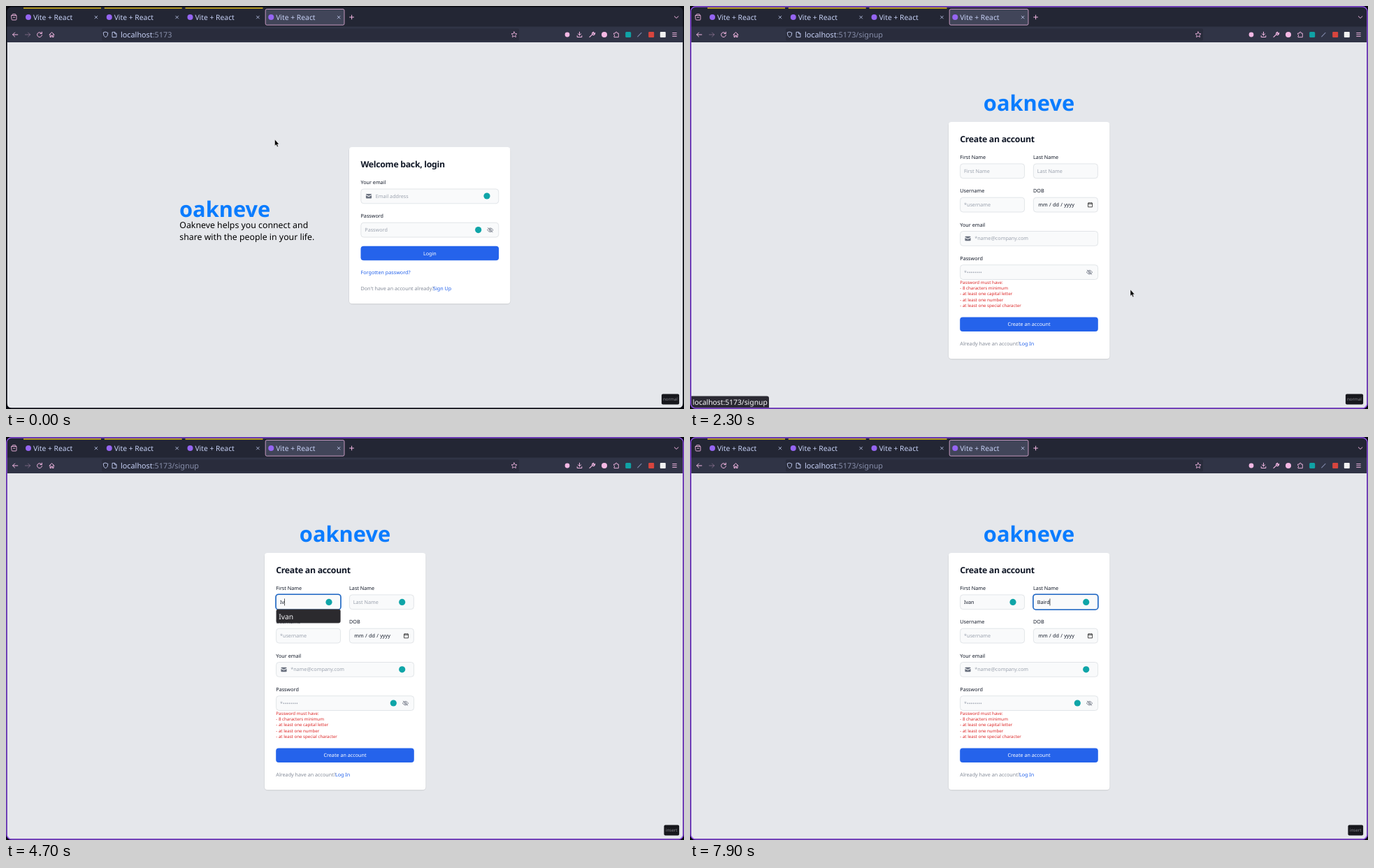
Write an HTML page that moves like this. It is 970 px wide and 577 px high and loops after 8000 ms.

```html
<!DOCTYPE html>
<html lang="en">
<head>
<meta charset="utf-8">
<title>Sign up demo</title>
<style>
  html, body { margin: 0; width: 100%; height: 100%; overflow: hidden; background: #08090f; }
  svg { display: block; width: 970px; height: 577px; font: 7.19px "Noto Sans", sans-serif; text-rendering: geometricPrecision; }
  text { white-space: pre; }
  .m { font-weight: 500; }
  .logo { font-size: 30.8px; font-weight: 700; fill: #0a7cff; }
  .head { font-size: 12.32px; font-weight: 700; letter-spacing: -.025em; fill: #111827; }
  .lead { font-size: 12.32px; }
  .ui { font-size: 10.33px; fill: #c6d0f5; }
  .url { font-size: 10.82px; fill: #c6d0f5; }
  .rule { font-size: 6.16px; font-weight: 500; fill: #dc2626; }
  .mode { font-size: 6.2px; fill: #85858c; text-anchor: middle; }
  .dark { fill: #111827; }
  .date { fill: #111827; word-spacing: .45px; }
  .hint { fill: #9ca3af; }
  .light { font-weight: 300; fill: #858c99; }
  .blue { fill: #2563eb; }
  .mid { text-anchor: middle; }
  .line { fill: none; stroke: #f4b8e4; stroke-linecap: round; stroke-linejoin: round; }
</style>
</head>
<body>
<svg id="stage" viewBox="0 0 970 577"></svg>
<script>
const stage = document.getElementById('stage');
const el = id => document.getElementById(id);

// Markup helpers
const text = (x, y, s, cls = '', extra = '') => `<text x="${x}" y="${y}" class="${cls}" ${extra}>${s}</text>`;
const rect = (x, y, w, h, fill, r = 0, extra = '') =>
  `<rect x="${x}" y="${y}" width="${w}" height="${h}" rx="${r}" fill="${fill}" ${extra}/>`;
const dot = (x, y, r, fill) => `<circle cx="${x}" cy="${y}" r="${r}" fill="${fill}"/>`;
const line = (d, w = 1, extra = '') => `<path class="line" d="${d}" stroke-width="${w}" ${extra}/>`;
const group = (id, body) => `<g id="${id}">${body}</g>`;
const card = (x, y, w, h) =>
  rect(x, y + .8, w, h, '#0000', 4.5, 'stroke="#000" stroke-opacity=".07" stroke-width="1.6"') + rect(x, y, w, h, '#fff', 4);
const field = (x, y, w) => rect(x, y, w, 20.8, '#f9fafb', 4, 'stroke="#d1d5db" stroke-width=".6"');
const button = (x, y, label, id) =>
  rect(x, y, 197.6, 20.5, '#2563eb', 4, `id="${id}"`) + text(x + 98.8, y + 12.8, label, 'm mid', 'fill="#fff"');
const badge = (x, y) => dot(x, y, 4.6, '#0fa5a8');
const mail = (x, y) => `<g transform="translate(${x} ${y})" fill="#6b7280">
  <path d="M-4.1-2.2Q-4.1-3.2-3.1-3.2H3.1Q4.1-3.2 4.1-2.2L0-.1ZM-4.1-1.1L0 1L4.1-1.1V2.3Q4.1 3.3 3.1 3.3H-3.1Q-4.1 3.3-4.1 2.3Z"/></g>`;
const eye = (x, y) => `<g transform="translate(${x} ${y})" fill="none" stroke="#6b7280" stroke-width=".8">
  <path d="M-4.3 0Q0-5.6 4.3 0Q0 5.6-4.3 0ZM-3.6-3.4L3.6 3.4"/><circle r="1.5"/></g>`;
const popup = (id, x, w, h, names) => group(id, rect(x, 246.8, w, h, '#2b2a2e', 2.5, 'stroke="#48474d" stroke-width=".5"') +
  names.map((n, i) => text(x + 3.4, 260.8 + i * 22, n, 'ui', 'style="fill:#f4f4f8"')).join(''));

function chrome() {
  const tabs = [0, 1, 2, 3].map(i => {
    const x = 25 + i * 115.75;
    const frame = i < 3 ? rect(x, 2.2, 111, 1.6, '#d3b51f')
      : rect(371.2, 4.5, 112.8, 22.7, '#414559', 2, 'stroke="#f4b8e4" stroke-width=".75"');
    return frame + dot(x + 7, 16, 4, '#9565f2') + text(x + 13.9, 20, 'Vite + React', 'ui') +
      line(`M${x + 102} 14.2l3.8 3.8m0-3.8l-3.8 3.8`, .8, 'style="stroke:#c6d0f5"');
  }).join('');
  return rect(1.5, 1.5, 967, 574, '#232634', 6) + rect(1.5, 29.5, 967, 23, '#303446') +
    rect(137, 32.3, 597, 17.4, '#292c3c', 2) + tabs +
    line('M8 13.5h7v5.5q0 1-1 1h-5q-1 0-1-1zM8.5 13.5l1-1.8h4l1 1.8M10.4 16.2h2.3', .9) +
    line('M491.7 16h5.8m-2.9-2.9v5.8') + line('M956.3 14.8l2.8 2.6l2.8-2.6') +
    line('M16.8 41H9.6m3-3l-3 3l3 3') + line('M27.4 41h7.2m-3-3l3 3l-3 3', 1, 'opacity=".35"') +
    line('M51 39.4a3.4 3.4 0 1 0 .4 2.3M51.3 37.2v2.4h-2.4') +
    line('M62 41l3.5-3.3l3.5 3.3M63 40.5v4h1.6v-2.4h1.8v2.4h1.6v-4') +
    line('M142.5 37.2l3.3 1.2q.2 4.6-3.3 6.6q-3.5-2-3.3-6.6z', .9, 'style="stroke:#c6d0f5"') +
    line('M152.4 37.4h3.4l2.2 2.2v5h-5.6zM155.6 37.6v2.2h2.2', .9, 'style="stroke:#c6d0f5"') +
    line('M727 36.9l1.2 2.6 2.8.3-2.1 1.9.6 2.8-2.5-1.4-2.5 1.4.6-2.8-2.1-1.9 2.8-.3z', .8) +
    dot(803, 41, 3.4, '#f4b8e4') +
    line('M820.5 37.2v4.6m-2.2-2l2.2 2.1l2.2-2.1M817.2 42.6v1.9h6.6v-1.9') +
    line('M835 44.4l3.6-3.6M838.8 40.8q-1-2.4 1.8-3.5l-.4 1.8 1.3.7 1-1.4q.4 3-2.4 3.2z', 1.2) +
    dot(856, 41, 4, '#f4b8e4') +
    line('M870 39h2v-1.2q1.3-1.4 2.3 0V39h2v5.6h-6.3v-1.6q2-1 0-2.1z', .9) +
    rect(886.2, 37, 8, 8, '#10a3a6', 1.5) + line('M903.7 43.8l5.3-5.5', 1.1, 'style="stroke:#7f86a8"') +
    rect(919.2, 37, 8, 8, '#d8453e', 1) + rect(935.8, 37, 8, 8, '#f2f2f2', 1) +
    line('M953.7 38.5h5.6m-5.6 2.5h5.6m-5.6 2.5h5.6', .9) +
    `<text x="164" y="45" class="url">localhost<tspan fill="#888fab">:5173<tspan id="path">/signup</tspan></tspan></text>` +
    '<path d="M1.8 52H968.2V569Q968.2 575.3 962 575.3H8Q1.8 575.3 1.8 569Z" fill="#e5e7eb"/>';
}

function loginPage() {
  return text(248, 302, 'oakneve', 'logo') +
    text(248.3, 318.3, 'Oakneve helps you connect and', 'lead') +
    text(248.3, 334.6, 'share with the people in your life.', 'lead') +
    card(491, 202, 230.4, 224) + text(507.5, 231.2, 'Welcome back, login', 'head') +
    text(507.5, 254.6, 'Your email', 'm dark') + field(507.8, 262, 197) + mail(519, 272.2) +
    text(528.8, 274.7, 'Email address', 'hint') + badge(688, 272) +
    text(507.5, 302.9, 'Password', 'm dark') + field(507.8, 310.2, 197) +
    text(513.3, 323, 'Password', 'hint') + badge(675.7, 320.6) + eye(692.8, 320.7) +
    button(507.5, 343.7, 'Login', 'loginButton') +
    text(507.5, 384.2, 'Forgotten password?', 'm blue') +
    text(507.5, 406.8, "Don't have an account already?", 'light') +
    text(611, 406.8, 'Sign Up', 'm blue', 'id="signUp"');
}

function signupPage() {
  const rules = ['Password must have:', '- 8 characters minimum', '- at least one capital letter',
    '- at least one number', '- at least one special character'];
  return text(485, 150.2, 'oakneve', 'logo mid') + card(370, 166, 230.4, 339) +
    text(386.3, 194.8, 'Create an account', 'head') +
    text(386.3, 218.7, 'First Name', 'm dark') + field(386.6, 225.9, 92) +
    text(491.1, 218.7, 'Last Name', 'm dark') + field(491.4, 225.9, 92) +
    text(386.3, 267.2, 'Username', 'm dark') + field(386.6, 274.2, 92) + text(392, 287.1, '*username', 'hint') +
    text(491.1, 267.2, 'DOB', 'm dark') + field(491.4, 274.2, 92) + text(498.3, 287.1, 'mm / dd / yyyy', 'date') +
    '<path d="M569.5 282h6v5.8h-6zM569.5 283.3h6M571 281v1M574 281v1" fill="none" stroke="#222" stroke-width=".8"/>' +
    text(386.3, 315.5, 'Your email', 'm dark') + field(386.6, 322.5, 197) + mail(397.5, 333) +
    text(407.2, 335.3, '*name@company.com', 'hint') +
    text(386.3, 363.7, 'Password', 'm dark') + field(386.6, 370.7, 197) +
    text(392, 383.6, '*••••••••', 'hint') + eye(571.5, 381.2) +
    rules.map((r, i) => text(386.3, 398 + i * 8.22, r, 'rule')).join('') +
    button(386.2, 445.4, 'Create an account', 'createButton') +
    text(386.3, 485.8, 'Already have an account?', 'light') + text(470.9, 485.8, 'Log In', 'm blue') +
    rect(386, 225.2, 93, 22, 'none', 4, 'id="ring" stroke="#1a64c4" stroke-width="1.6"') +
    text(392, 239, '', '', 'id="first"') + text(496.8, 239, '', '', 'id="last"') +
    rect(0, 231.4, .7, 10, '#111', 0, 'id="caret"') +
    group('badges', badge(462, 236.4) + badge(566.7, 236.4) + badge(566.7, 332.8) + badge(554.3, 381)) +
    group('panel', rect(386, 249, 179, 99, '#fff', 3, 'stroke="#d1d5db" stroke-width=".7"')) +
    popup('firstMenu', 386.8, 91.6, 19.4, ['Ivan']) + popup('lastMenu', 491.6, 91.6, 46, ['Baird', 'Bailey']);
}

const cursors =
  '<path id="arrow" d="M0 0V9.2L2 7.4L3.5 10.7L5 10L3.6 6.9H6.2Z" fill="#000" stroke="#fff" stroke-width=".5"/>' +
  '<path id="hand" d="M-.8.4Q0-.5.8.4V3.6L4.2 4.4Q5.2 4.8 5 6L4.2 8.4V10H-.2V8.6L-2.5 6.2Q-2.6 4.9-.8 6Z" fill="#000" stroke="#fff" stroke-width=".5"/>' +
  '<path id="beam" d="M-1.8-4.8Q0-4.8 0-3.8Q0-4.8 1.8-4.8M0-4V4.2M-1.8 5Q0 5 0 4Q0 5 1.8 5" fill="none" stroke="#222" stroke-width=".9"/>';

stage.innerHTML = rect(0, 0, 970, 577, '#08090f') + chrome() + group('login', loginPage()) + group('signup', signupPage()) +
  rect(937.9, 555.4, 25.2, 15.2, '#17181d', 2, 'id="modeBox"') + text(950.4, 565.2, 'normal', 'mode', 'id="mode"') +
  group('status', '<path d="M1.5 558.4H110Q113 558.4 113 561.4V575.6H1.5Z" fill="#2b2a33"/>' +
    text(3.8, 571.2, 'localhost:5173/signup', 'ui', 'style="fill:#fbfbfe"')) +
  rect(1, 1, 968, 575, 'none', 7, 'id="border" stroke="#8d4ee6" stroke-width="1.5"') + group('cursor', cursors);

const route = [[0, 384.5, 191], [200, 384.5, 191], [300, 440, 240], [400, 567, 350], [500, 647, 419], [600, 647, 419],
  [1100, 630.5, 404.8], [1900, 630.5, 404.8], [2000, 630, 405.4], [2300, 630, 406], [2800, 465, 257], [2900, 465, 257],
  [3200, 444, 243], [8000, 444, 243]];
const firstTyping = [4300, 4600, 4900, 5100];
const lastTyping = [6500, 7200, 7300, 7500, 7800];

const show = (id, on) => el(id).setAttribute('opacity', +on);
const span = (t, a, b) => t >= a && t < b;
const typed = (word, times, t) => word.slice(0, times.filter(k => t >= k).length);

function position(t) {
  const i = Math.max(1, route.findIndex(k => k[0] >= t));
  const [a, b] = [route[i - 1], route[i]];
  const p = (t - a[0]) / (b[0] - a[0]);
  return [a[1] + (b[1] - a[1]) * p, a[2] + (b[2] - a[2]) * p];
}

function setInput(id, value, hint) {
  el(id).textContent = value || hint;
  el(id).setAttribute('class', value ? 'dark' : 'hint');
  return value ? el(id).getComputedTextLength() : 0;
}

function draw(t) {
  const signup = t >= 2200, onLast = t >= 5400, insert = t >= 4300;
  show('login', !signup);
  show('signup', signup);
  show('path', signup);
  show('border', signup ? (t < 2300 ? .5 : 1) : 0);
  show('status', span(t, 1300, 2700));
  show('badges', t >= 2500);
  show('ring', t >= 3600);
  show('caret', t >= 3600);
  show('panel', span(t, 3900, 4300));
  show('firstMenu', span(t, 4700, 5400) ? 1 : span(t, 5400, 5600) ? .4 : 0);
  show('lastMenu', span(t, 6600, 7400) ? 1 : span(t, 7400, 7500) ? .4 : 0);

  const wFirst = setInput('first', typed('Ivan', firstTyping, t), 'First Name');
  const wLast = setInput('last', typed('Baird', lastTyping, t), 'Last Name');
  el('caret').setAttribute('x', onLast ? 496.8 + wLast : 392 + wFirst);
  el('ring').setAttribute('x', onLast ? 490.9 : 386);

  el('modeBox').setAttribute('x', insert ? 941.4 : 937.9);
  el('modeBox').setAttribute('width', insert ? 21.7 : 25.2);
  el('mode').setAttribute('x', insert ? 952.2 : 950.4);
  el('mode').textContent = insert ? 'insert' : 'normal';

  const overButton = span(t, 400, 500), overLink = span(t, 1000, 2200);
  el('loginButton').setAttribute('fill', overButton ? '#1d4ed8' : '#2563eb');
  el('signUp').setAttribute('text-decoration', overLink ? 'underline' : 'none');
  const shape = overButton || overLink ? 'hand' : t >= 2700 ? 'beam' : 'arrow';
  for (const id of ['arrow', 'hand', 'beam']) show(id, id === shape);
  show('cursor', !insert);
  el('cursor').setAttribute('transform', `translate(${position(t)})`);
}

const start = performance.now();
function tick() {
  draw(Math.floor((performance.now() - start) % 8000 / 100) * 100);
  requestAnimationFrame(tick);
}
tick();
</script>
</body>
</html>
```
